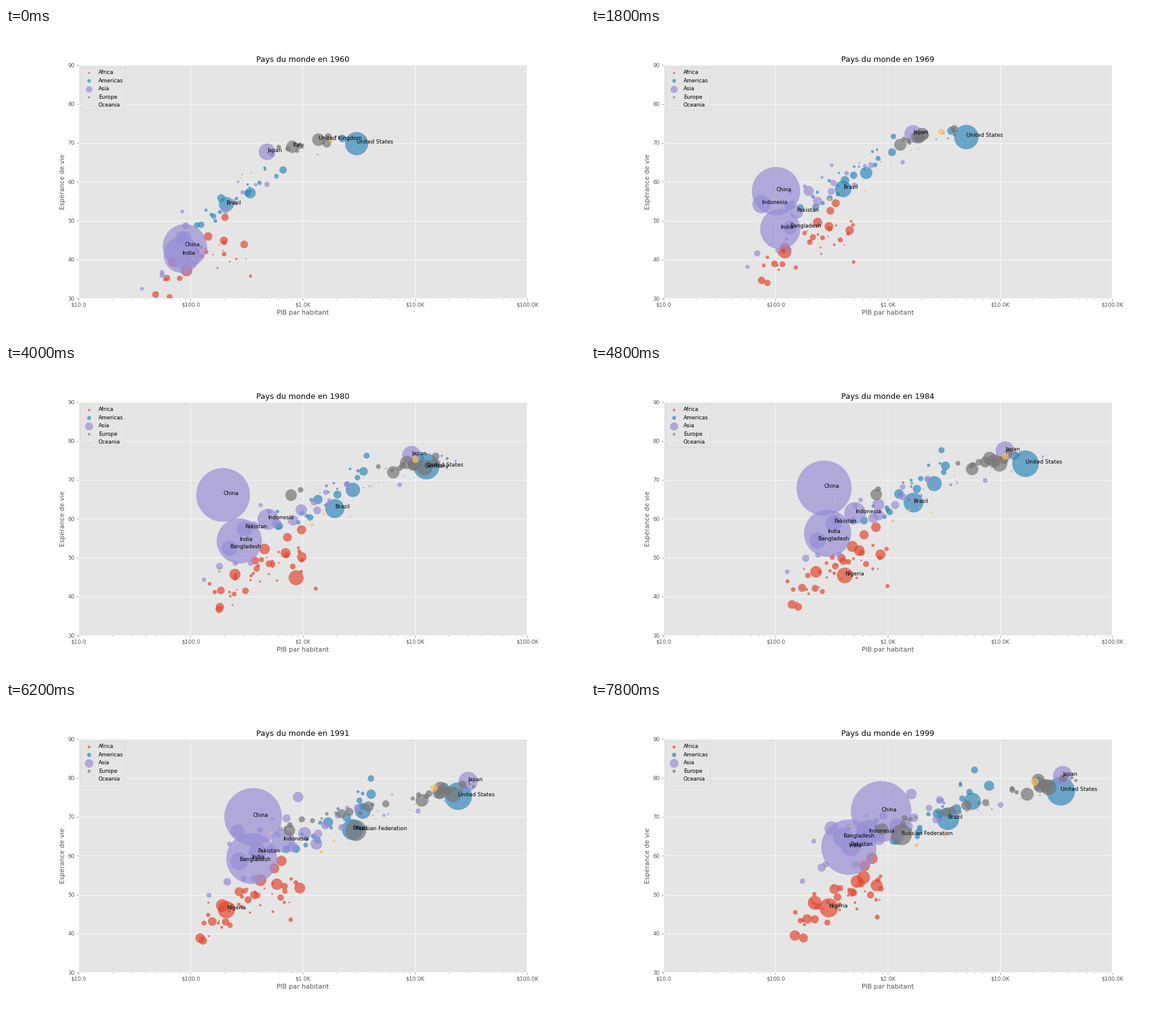
These frames come from a looping animation (958 by 511 pixels, 8000 ms). A matplotlib script:

```python
import numpy as np
import matplotlib.pyplot as plt
from matplotlib.animation import FuncAnimation
from matplotlib.ticker import FuncFormatter, NullFormatter

W, H, DPI = 958, 511, 64
YEARS = np.arange(40)
LAST = YEARS[-1]
KEYS = (0, 9, 16, 20, 25, 27, 34, 39)  # turning points of world income
COLORS = {"Africa": "#E24A33", "Americas": "#348ABD", "Asia": "#988ED5",
          "Europe": "#777777", "Oceania": "#FBC15E"}
AF, AM, AS, EU, OC = COLORS
countries = {region: [] for region in COLORS}
rng = np.random.default_rng(7)


def income(values):
    """Yearly log10 income; a short series belongs to the last key years."""
    return np.interp(YEARS, KEYS[-len(values):], np.log10(values))


def ease(start, end, bend, since=0):
    """Exponential ease: bend > 0 is fast first, bend < 0 fast last."""
    u = np.clip((YEARS - since) / (LAST - since), 0, 1)
    return start + (end - start) * np.expm1(-bend * u) / np.expm1(-bend)


def add(region, pop, log_gdp, life, since=0, name=""):
    """Keep one country; pop is millions at evenly spaced years."""
    log_pop = np.interp(YEARS, np.linspace(0, LAST, len(pop)), np.log(pop))
    countries[region].append({"gdp": 10 ** log_gdp, "life": life, "pop": np.exp(log_pop),
                              "since": since, "name": name})


def leader(name, region, pop, gdp, life, since=0):
    add(region, pop, income(gdp), ease(*life, since), since, name)


def group(region, n, sizes, growth, gdp, spread, life, bend=0.5, slope=2.0,
          scatter=1.5, since=(0,)):
    """Countries along a shared route; the richer ones live longer."""
    route = income(gdp)
    ranks = rng.permutation(np.linspace(-1.7, 1.7, n))
    for rank, size in zip(ranks, np.geomspace(*sizes, n)):
        wobble = np.interp(YEARS, KEYS, rng.normal(0, 0.05, len(KEYS)))
        offset = slope * rank + rng.normal(0, scatter)
        add(region, (size, size * growth), route + spread * rank + wobble,
            ease(*life, bend) + offset, int(rng.choice(since)))


# --- the most populous countries: income at the key years, life expectancy eased ---
leader("China", AS, (667, 980, 1253), (89, 101, 165, 195, 294, 252, 473, 873), (43.4, 71.4, 2.8))
leader("India", AS, (450, 690, 1040), (83.6, 110, 164, 272, 296, 347, 353, 450), (41.2, 62.2, 0.9))
leader("Japan", AS, (93, 117, 127),
       (481, 1685, 5115, 9335, 11600, 20400, 39600, 36300), (67.7, 80.6, 1.3))
leader("Indonesia", AS, (88, 147, 208), (75, 279, 490, 516, 441, 912, 673), (53, 66, 1), since=7)
leader("Pakistan", AS, (45, 78, 135), (83, 154, 193, 304, 338, 340, 439, 467), (45.7, 62.5, 1.6))
leader("Bangladesh", AS, (48, 80, 130), (89, 134, 139, 223, 241, 249, 289, 400), (45.7, 64.7, -1.3))
leader("United States", AM, (181, 227, 279),
       (3020, 5020, 8610, 12650, 18200, 20150, 28000, 34800), (69.8, 76.6, 0.2))
leader("Brazil", AM, (72, 121, 171),
       (208, 400, 1373, 1932, 1640, 2055, 3483, 3440), (54.2, 69.5, 0.3))
leader("Mexico", AM, (38, 68, 98), (341, 643, 1416, 2800, 2550, 1750, 5680, 5680), (57.1, 74, 0.8))
leader("Canada", AM, (18, 24, 30),
       (2260, 3680, 8700, 11100, 14100, 16200, 19900, 22100), (71.1, 79.1, 0.2))
leader("Nigeria", AF, (45, 73, 120), (92, 121, 555, 873, 344, 272, 171, 298), (37.2, 46.6, 2.8))
leader("United Kingdom", EU, (52.4, 56.3, 58.7),
       (1380, 2030, 4020, 9930, 8650, 12970, 19650, 25500), (70.8, 78, -0.4))
leader("Italy", EU, (50.2, 56.4, 56.9),
       (810, 1837, 4065, 8450, 7990, 14140, 19290, 21980), (69, 79.4, 0.1))
leader("Germany", EU, (73, 78, 82),
       (2550, 6640, 12190, 9430, 16520, 27130, 27130), (70.5, 77.6, 0.2), since=10)
leader("Russian Federation", EU, (148, 147), (3430, 2667, 1323), (67.5, 65.4, 3), since=29)
leader("Australia", OC, (10.3, 14.7, 19),
       (1800, 3000, 7450, 10150, 11400, 11500, 18000, 20500), (70.8, 79, 0.2))

# --- everyone else, one route per kind of country ---
group(AF, 46, (25, 0.3), 2.5, (130, 185, 300, 430, 350, 360, 330, 380), 0.25,
      (42, 50.5), 2, slope=3, scatter=3.5, since=(0, 0, 0, 0, 1, 5, 20))
group(AS, 12, (28, 3), 2.3, (190, 290, 620, 1000, 1050, 1150, 1450, 1500), 0.23,
      (54, 69), 1, slope=3, scatter=2.5, since=(0, 0, 0, 5))
group(AS, 4, (10, 4), 2.2, (60, 90, 130, 200, 210, 230, 240, 320), 0.14,
      (36, 57), 0.4, scatter=3)
group(AS, 10, (4.6, 0.2), 2, (520, 1000, 3600, 6500, 6600, 7000, 9500, 10500), 0.32,
      (62, 74), 1, slope=2.5, since=(0, 5, 8, 15))
group(AS, 6, (50, 3), 1.3, (500, 420, 600), 0.2, (64, 68.5), scatter=2, since=(25, 30))
group(AM, 20, (20, 1), 1.9, (270, 440, 1000, 1500, 1400, 1450, 2250, 2800), 0.22,
      (56, 71), 0.8, slope=4, scatter=2)
group(AM, 9, (0.4, 0.05), 1.4, (450, 850, 2000, 3500, 4200, 4700, 6300, 7500), 0.22,
      (63, 72.5), 0.8, since=(0, 10, 17))
group(EU, 15, (46, 0.4), 1.2, (1150, 2300, 5300, 10300, 8400, 14300, 21500, 24000), 0.16,
      (69.8, 78.2), 0.2, slope=0.9, scatter=0.6, since=(0, 0, 0, 9))
group(EU, 14, (44, 1.5), 1, (1900, 1750, 2300), 0.26, (69, 70.8), slope=1.7,
      scatter=0.7, since=(20, 27, 28, 30))
group(OC, 8, (2.4, 0.08), 1.7, (260, 420, 900, 1350, 1200, 1400, 2000, 2000), 0.3,
      (57, 67), slope=3, scatter=2, since=(0, 0, 10, 17))

# --- chart ---
plt.style.use("ggplot")
plt.rcParams["font.family"] = "DejaVu Sans"
fig = plt.figure(figsize=(W / DPI, H / DPI), dpi=DPI, facecolor="white")
ax = fig.add_axes([0.125, 0.125, 0.775, 0.755])
ax.set_xscale("log")
ax.set_xlim(10, 1e5)
ax.set_ylim(30, 90)
ax.set_xlabel("PIB par habitant")
ax.set_ylabel("Espérance de vie")
ax.xaxis.set_major_formatter(FuncFormatter(
    lambda v, _: f"${v / 1000:.1f}K" if v >= 1000 else f"${v:.1f}"))
ax.xaxis.set_minor_formatter(NullFormatter())

dots = {region: ax.scatter([100], [50], c=color, alpha=0.7, linewidths=0.5, label=region)
        for region, color in COLORS.items()}
labels = [ax.text(100, 50, "", fontsize=10, color="black", zorder=5) for _ in range(10)]


def update(i):
    named = []
    for region, members in countries.items():
        alive = [c for c in members if c["since"] <= i]
        dots[region].set_offsets([(c["gdp"][i], c["life"][i]) for c in alive])
        dots[region].set_sizes([10 * c["pop"][i] for c in alive])
        named += [c for c in alive if c["name"]]
    named.sort(key=lambda c: -c["pop"][i])
    # the number of labels grows as more countries report data
    shown = 7 + (i >= 7) + (i >= 10) + (i >= 29)
    for k, label in enumerate(labels):
        label.set_text(named[k]["name"] if k < shown else "")
        label.set_position((named[k]["gdp"][i], named[k]["life"][i]))
    ax.set_title(f"Pays du monde en {1960 + i}")
    ax.legend(loc="upper left", markerscale=0.2)
    return []


anim = FuncAnimation(fig, update, frames=len(YEARS), init_func=lambda: [],
                     interval=200, repeat=True, repeat_delay=0, blit=False)
plt.show()
```
